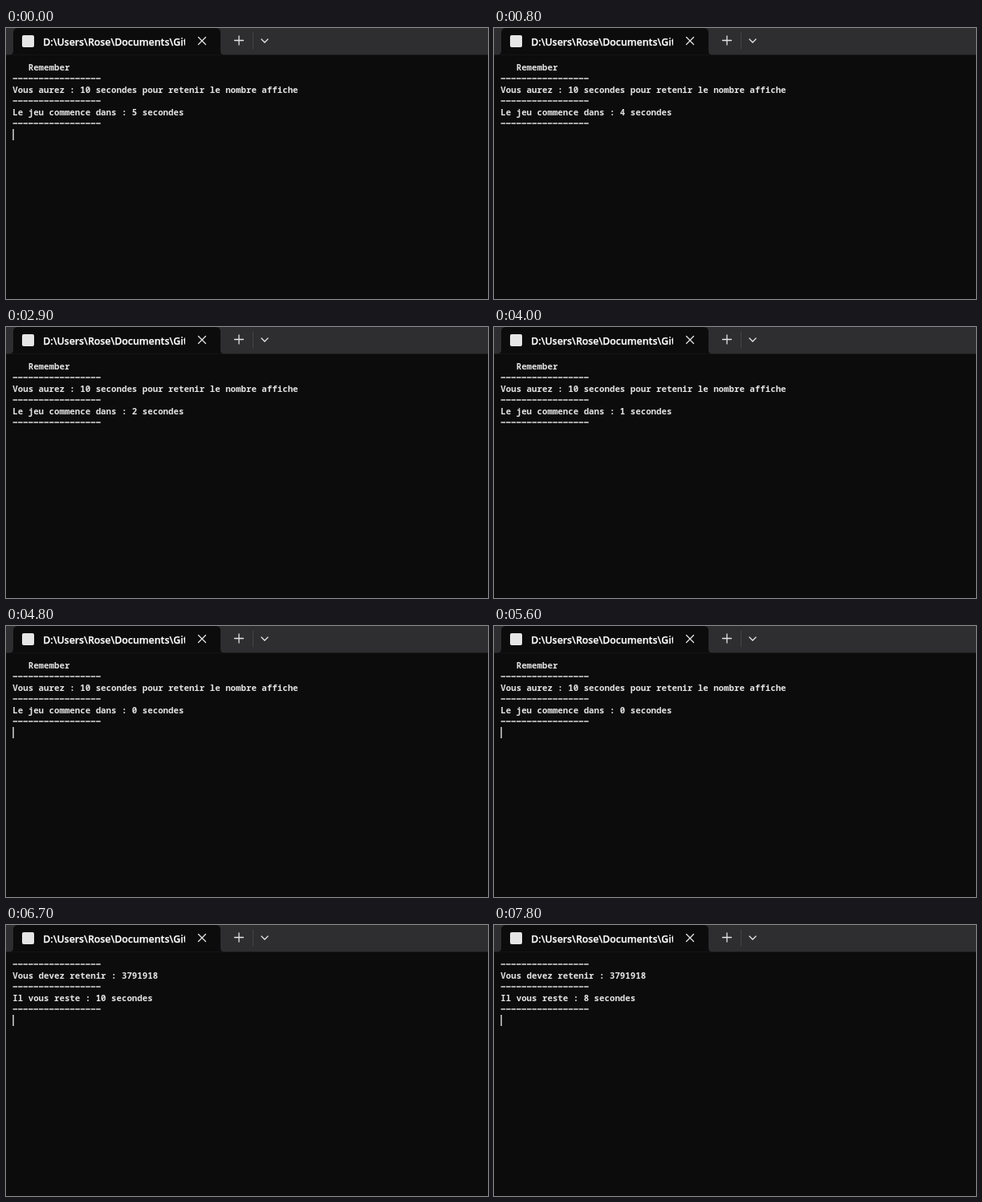
An HTML page for the animation above (8 s loop, 600x338 px).

```html
<!DOCTYPE html>
<html lang="fr">
<head>
<meta charset="utf-8">
<title>Terminal</title>
<style>
  html, body { margin: 0; width: 100%; height: 100%; overflow: hidden; background: #0c0c0c; }
  svg { display: block; width: 600px; height: 338px; }
  .title { font: 600 12.35px "Open Sans", "Noto Sans", sans-serif; fill: #fff; stroke: #fff; stroke-width: .25; }
  .out { font: 600 10.78px "Noto Sans Mono", "DejaVu Sans Mono", monospace; fill: #e4e4e4; }
  .out path { stroke: #dcdcdc; stroke-width: 1.3; stroke-dasharray: 5.6 .87; }
  .icons { fill: none; stroke: #e6e6e6; stroke-width: 1.3; stroke-linecap: round; }
</style>
</head>
<body>
<svg viewBox="0 0 600 338">
  <clipPath id="tabClip"><rect x="40" y="4" width="183" height="26"/></clipPath>
  <rect width="600" height="338" fill="#0c0c0c"/>
  <rect width="600" height="33.5" fill="#2e2d2f"/>
  <path d="M4 33.5q5 0 5-5V6q0-6 6-6H261q6 0 6 6V28.5q0 5 5 5z" fill="#0c0c0c"/>
  <rect x="20" y="9" width="15" height="15" rx="2" fill="#e6e6e6"/>
  <text class="title" x="46.2" y="21.6" clip-path="url(#tabClip)">D:\Users\Rose\Documents\Git</text>
  <g class="icons">
    <path d="M239.5 11.5l9 9m0-9l-9 9"/>
    <path d="M284.5 15.5h11M290 10v11"/>
    <path d="M318 14l4 4 4-4"/>
    <path d="M307.5 6v20" stroke="#464547" stroke-width="1"/>
  </g>
  <g id="screen" class="out"></g>
  <rect id="cursor" x="8.4" width="1.3" height="14" fill="#f2f2f2"/>
</svg>
<script>
const LOOP = 8000, LEFT = 8.3, TOP = 53, ROW = 14, CELL = 6.47;
const RULE = "-".repeat(17);
const startTicks = [700, 1700, 2700, 3700, 4800];
const recallTicks = [6800, 7800];
const blinks = [200, 700, 800, 1300, 1800, 2400, 2900, 3500, 4000, 4600,
                5100, 5600, 6200, 6700, 7300, 7800];
const screen = document.getElementById("screen");
const cursor = document.getElementById("cursor");

const passed = (times, t) => times.filter(x => x <= t).length;

function linesAt(t) {
  if (t < 5800) return [
    "\u00a0\u00a0\u00a0Remember", RULE,
    "Vous aurez : 10 secondes pour retenir le nombre affiche", RULE,
    `Le jeu commence dans : ${5 - passed(startTicks, t)} secondes`, RULE
  ];
  return [
    RULE, "Vous devez retenir : 3791918", RULE,
    `Il vous reste : ${10 - passed(recallTicks, t)} secondes`, RULE
  ];
}

// Rules are dashed strokes, one dash per character cell.
function lineMarkup(line, i) {
  const y = TOP + i * ROW;
  return line === RULE
    ? `<path d="M${LEFT + .3} ${y - 4}h${RULE.length * CELL}"/>`
    : `<text x="${LEFT}" y="${y}">${line}</text>`;
}

let shown = "";
function draw(now) {
  const t = now % LOOP;
  const lines = linesAt(t);
  const key = lines.join("\n");
  if (key !== shown) {
    shown = key;
    screen.innerHTML = lines.map(lineMarkup).join("");
  }
  cursor.setAttribute("y", TOP - 11 + lines.length * ROW);
  cursor.setAttribute("visibility", passed(blinks, t) % 2 ? "hidden" : "visible");
}

const start = performance.now();
function tick() {
  draw(performance.now() - start);
  requestAnimationFrame(tick);
}
tick();
</script>
</body>
</html>
```
